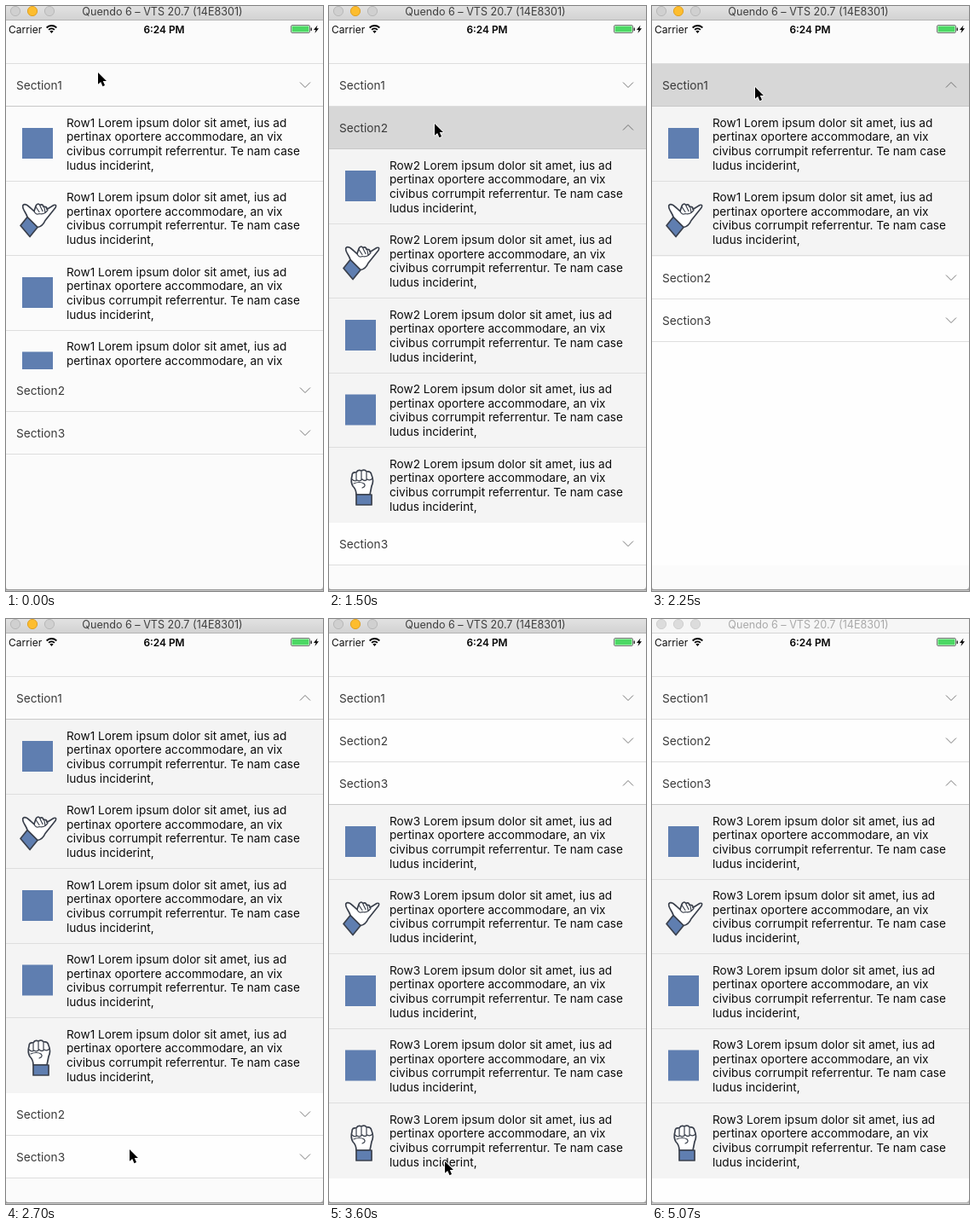
Animation, 372 px wide and 686 px high, one loop 5.17 s. Source, as an HTML page with a canvas:

```html
<!DOCTYPE html>
<html lang="en">
<head>
<meta charset="utf-8">
<title>Accordion list</title>
<style>
html, body { margin: 0; width: 372px; height: 686px; overflow: hidden; background: #fbfbfb; }
canvas { display: block; width: 372px; height: 686px; }
</style>
</head>
<body>
<canvas id="stage"></canvas>
<script>
const W = 372, H = 686, LOOP = 5170, TICK = 150;
const HEADER = 50, ROW = 87.5, ROWS = 5, FULL = ROW * ROWS, TOP = 68, BOTTOM = 684;
const OPENING = 260, CLOSING = 230, TRAVEL = 300;
const INK = '#3a404c', BLUE = '#5f7eb0', LINE = '#dedede', SANS = 'Inter, sans-serif';
const LINES = [
  'Lorem ipsum dolor sit amet, ius ad',
  'pertinax oportere accommodare, an vix',
  'civibus corrumpit referrentur. Te nam case',
  'ludus inciderint,'
];

// Each tap toggles one section and closes the one that was open.
const TAPS = [
  { time: -83, section: 1 }, { time: 765, section: 2 }, { time: 1514, section: 2 },
  { time: 2191, section: 1 }, { time: 3275, section: 3 }
];

// The pointer glides to each stop, leaving at the given time.
const STOPS = [
  { time: 325, x: 123, y: 137 }, { time: 1725, x: 120, y: 94 }, { time: 2529, x: 146, y: 666 },
  { time: 2850, x: 135, y: 635 }, { time: 4050, x: 183, y: 650 }
];
const POINTER_GONE = 4340, INACTIVE = 5070;

const canvas = document.getElementById('stage');
const ctx = canvas.getContext('2d');
const dpr = window.devicePixelRatio || 1;
canvas.width = W * dpr;
canvas.height = H * dpr;

const unit = u => Math.min(1, Math.max(0, u));
const easeOut = (u, power) => 1 - (1 - unit(u)) ** power;
const smooth = u => unit(u) ** 2 * (3 - 2 * unit(u));

function listState(t) {
  const changed = [0, -LOOP, -LOOP, -LOOP];
  let open = 1;
  for (const { time, section } of TAPS.filter(tap => tap.time <= t)) {
    changed[open] = changed[section] = time;
    open = open === section ? 0 : section;
  }
  const heights = [1, 2, 3].map(s => {
    const age = t - changed[s];
    return Math.round(FULL * (s === open ? easeOut(age / OPENING, 2) : 1 - smooth(age / CLOSING)));
  });
  return { open, heights, bottom: TOP + 3 * HEADER + heights.reduce((a, b) => a + b) };
}

const isPressed = (section, t) =>
  TAPS.some(tap => tap.section === section && t - tap.time > -15 && t - tap.time < 80);

function pointerAt(t) {
  let x = 107, y = 77;
  for (const stop of STOPS) {
    const p = easeOut((t - stop.time) / TRAVEL, 3);
    x += (stop.x - x) * p;
    y += (stop.y - y) * p;
  }
  return [Math.round(x), Math.round(y)];
}

function rect(x, y, w, h, color) {
  ctx.fillStyle = color;
  ctx.fillRect(x, y, w, h);
}

function text(str, x, y, size, color, weight = 400, align = 'left') {
  ctx.font = `${weight} ${size}px ${SANS}`;
  ctx.textAlign = align;
  ctx.fillStyle = color;
  ctx.fillText(str, x, y);
}

function shape(path, fill, stroke, width = 1) {
  const p = new Path2D(path);
  if (fill) { ctx.fillStyle = fill; ctx.fill(p); }
  if (stroke) { ctx.strokeStyle = stroke; ctx.lineWidth = width; ctx.stroke(p); }
}

function clipped(y, h, paint) {
  ctx.save();
  ctx.beginPath();
  ctx.rect(0, y, W, h);
  ctx.clip();
  paint();
  ctx.restore();
}

function light(x, fill, stroke) {
  ctx.beginPath();
  ctx.arc(x, 6, 5.6, 0, Math.PI * 2);
  ctx.fillStyle = fill;
  ctx.fill();
  ctx.strokeStyle = stroke;
  ctx.lineWidth = 1;
  ctx.stroke();
}

function titleBar(active) {
  const g = ctx.createLinearGradient(0, 0, 0, 16);
  g.addColorStop(0, active ? '#e2e2e2' : '#f6f6f6');
  g.addColorStop(1, active ? '#d2d2d2' : '#f6f6f6');
  rect(0, 0, W, 16, g);
  rect(0, 16, W, 1, active ? '#b4b4b4' : '#d6d6d6');
  for (const x of [11, 31, 51]) {
    if (active && x === 31) light(x, '#fdbd2e', '#dfa023');
    else light(x, active ? '#d0d0d0' : '#dcdcdc', active ? '#b8b8b8' : '#cfcfcf');
  }
  text('Quendo 6 – VTS 20.7 (14E8301)', 183.5, 11, 12.6, active ? '#3e3e3e' : '#a9a9a9', 400, 'center');
}

function statusBar() {
  text('Carrier', 3, 31.5, 12, '#111');
  ctx.strokeStyle = '#000';
  ctx.lineWidth = 1.9;
  for (const r of [4.6, 8]) {
    ctx.beginPath();
    ctx.arc(53.5, 31, r, -Math.PI * 0.76, -Math.PI * 0.24);
    ctx.stroke();
  }
  shape('M53.5 32 L51.4 29.6 Q53.5 28 55.6 29.6 Z', '#000');
  text('6:24 PM', 185.5, 31.5, 11.9, '#000', 600, 'center');
  ctx.beginPath();
  ctx.roundRect(334.5, 22.5, 22, 9, 1.5);
  ctx.strokeStyle = '#777';
  ctx.lineWidth = 1;
  ctx.stroke();
  rect(335.5, 23.5, 20, 7, '#4cd964');
  rect(357.5, 25.5, 1.5, 3.5, '#333');
  shape('M365.5 22.5 L361 28 H363.6 L362.4 32 L367 26.3 H364.4 Z', '#000');
}

function shaka() {
  shape('M25 43 C24 38 18 33 20 29 C23 26 27 31 33 36 L35 30 Q37 26 40 29 Q43 27 44 31 Q48 30 48 34 L56 29 Q60 28 58 32 L46 47 Q43 54 37 55 Z', '#fff', INK, 1.7);
  shape('M35 31 L39 37 M40 30 L43 36 M45 32 L46 38 M33 36 Q35 41 39 39 Q43 40 46 38 L49 35', null, INK, 1.2);
  shape('M25 43 L17 53 L28 66 L37 55 Z', BLUE, INK, 1.7);
}

function fist() {
  shape('M32 56 Q32 50 28 46 Q25 41 27 34 Q27 29 32 30 Q34 26 38 28 Q42 26 44 29 Q49 28 50 33 Q53 40 50 46 L48 56 Z', '#fff', INK, 1.7);
  shape('M32 31 V39 M38 29 V38 M44 30 V38 M27 38 Q30 41 33 39 Q36 41 39 38 Q42 41 45 38 Q48 40 51 37 M29 43 Q36 40 41 43 Q44 46 39 48', null, INK, 1.2);
  shape('M32 56 H50 V68 H32 Z', BLUE, INK, 1.7);
}

const badge = () => rect(19, 26, 36, 36, BLUE);
const ICONS = [badge, shaka, badge, badge, fist];

function row(section, i, top) {
  LINES.forEach((line, n) => {
    text(n ? line : `Row${section} ${line}`, 71, top + 23.7 + n * 16.6, 13.65, '#0c0c0c');
  });
  ctx.save();
  ctx.translate(0, top - 1);
  ctx.lineJoin = ctx.lineCap = 'round';
  ICONS[i]();
  ctx.restore();
  if (i < ROWS - 1) rect(0, Math.floor(top + ROW - 0.5), W, 1, LINE);
}

function rows(section, y, height, fill) {
  clipped(y, height, () => {
    rect(0, y, W, height, fill);
    for (let i = 0; i < ROWS; i++) row(section, i, y + i * ROW);
  });
}

function header(section, y, open, pressed, height) {
  if (pressed) rect(0, y, W, HEADER, '#d7d7d7');
  text('Section' + section, 12, y + 29.5, 13.7, '#3a3a3a');
  const bend = open ? -3 : 3, mid = y + 24.5;
  ctx.lineJoin = 'miter';
  ctx.lineCap = 'butt';
  shape(`M345 ${mid - bend} L351 ${mid + bend} L357 ${mid - bend}`, null, '#555', 0.8);
  rect(0, y + HEADER - 1, W, 1, height ? '#c8c8c8' : LINE);
}

function list(tick) {
  const { open, heights } = listState(tick);
  let y = TOP;
  rect(0, TOP - 1, W, 1, LINE);
  heights.forEach((height, i) => {
    const section = i + 1;
    header(section, y, open === section, isPressed(section, tick), height);
    y += HEADER;
    rows(section, y, height, tick ? '#f4f4f4' : '#fbfbfb');
    y += height;
  });
}

// The area the list has covered so far stays slightly lighter.
function backdrop(tick) {
  let reach = 0;
  for (let k = 0; k <= tick; k += TICK) reach = Math.max(reach, listState(k).bottom);
  if (tick) rect(0, TOP + HEADER, W, reach - TOP - HEADER, '#fefefe');
}

function windowEdge(active) {
  rect(0, BOTTOM, W, 1, active ? '#969696' : '#b4b4b4');
  rect(0, BOTTOM + 1, W, 1, '#c9c9c9');
  shape('M372 680 Q372 684 368 684 H372 Z', '#b4b4b4');
  shape('M0 681 Q0 684 3 684 H0 Z', '#b4b4b4');
}

function pointer(x, y) {
  const arrow = 'M1 1 V14.8 L4.2 11.9 L6.5 17.2 L9 16.1 L6.8 11 H11 Z';
  ctx.save();
  ctx.translate(x, y);
  ctx.lineJoin = 'round';
  shape(arrow, null, '#fff', 1.6);
  shape(arrow, '#000');
  ctx.restore();
}

function draw(t) {
  const tick = Math.floor(t / TICK) * TICK;
  const active = t < INACTIVE;
  ctx.setTransform(dpr, 0, 0, dpr, 0, 0);
  rect(0, 0, W, H, '#fbfbfb');
  clipped(0, BOTTOM, () => {
    backdrop(tick);
    list(tick);
  });
  titleBar(active);
  statusBar();
  windowEdge(active);
  if (t < POINTER_GONE) pointer(...pointerAt(tick));
}

const start = performance.now();
function frame() {
  draw((performance.now() - start) % LOOP);
  requestAnimationFrame(frame);
}
frame();
</script>
</body>
</html>
```
